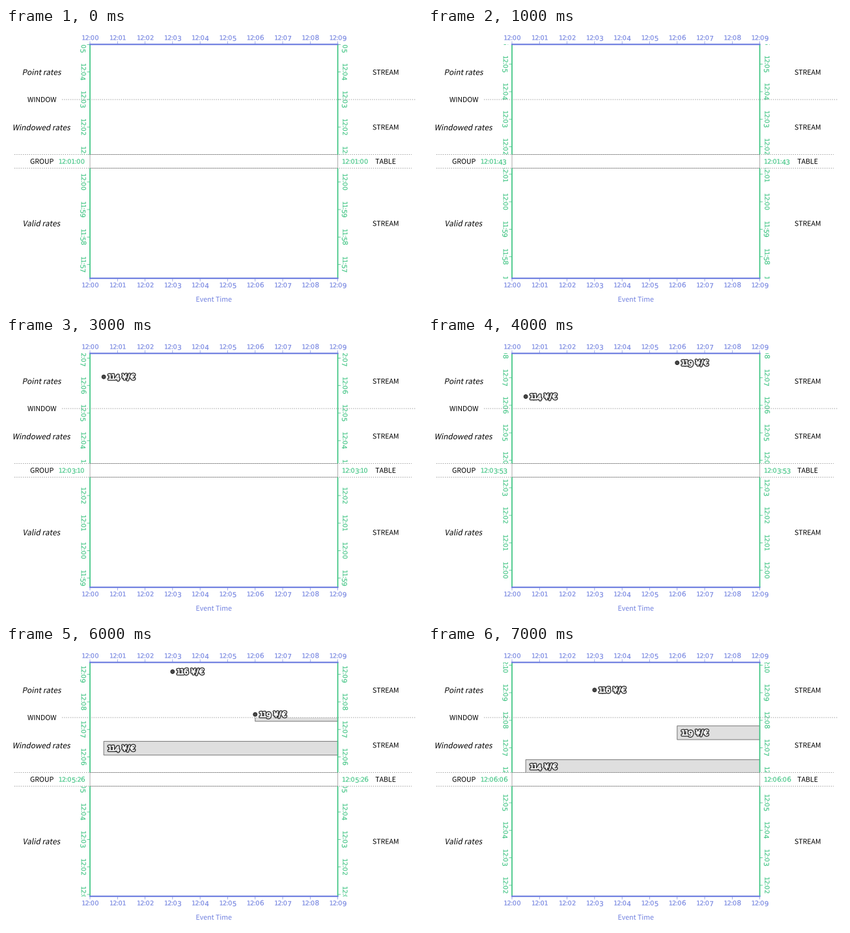
These frames come from a looping animation (639x432 px, 8 s). A matplotlib script:

```python
import matplotlib.pyplot as plt
from matplotlib.animation import FuncAnimation
from matplotlib.patches import Circle, PathPatch, Rectangle
from matplotlib.path import Path
from matplotlib.textpath import TextPath
from matplotlib.transforms import Affine2D

W, H, DPI = 639, 432, 72
BLUE, GREEN, DARK = "#7080e0", "#3cc481", "#3c3c3c"
LEFT, RIGHT, TOP, BOTTOM = 129, 509.6, 25.2, 384.8
WINDOW_Y, NOW_Y, TABLE_Y = 110, 194.5, 215.5
MINUTE = (RIGHT - LEFT) / 9

# Processing time in seconds after 12:00, one value per step.
CLOCK = [60, 103, 146, 190, 233, 279, 326, 366]
# Event minute, processing second, label.
EVENTS = [(0.5, 379, "114 ¥/€"), (6, 452.7, "119 ¥/€"), (3, 546, "116 ¥/€")]

# Glyph advances in ems; the other figures share one width.
ADVANCE = {"0": 0.68, "1": 0.48, "2": 0.57, ":": 0.28, " ": 0.38,
           "/": 0.4, "¥": 0.68, "€": 0.68}

# Keep fractional positions instead of rounding edges to whole pixels.
plt.rcParams["path.snap"] = False

fig = plt.figure(figsize=(W / DPI, H / DPI), dpi=DPI, facecolor="white")
ax = fig.add_axes([0, 0, 1, 1])
ax.set_xlim(0, W)
ax.set_ylim(H, 0)
ax.axis("off")


def clip_box(y0, y1):
    return Rectangle((0, y0), W, y1 - y0, transform=ax.transData)


PLOT_CLIP = clip_box(TOP - 0.5, BOTTOM)
ROW_CLIP = clip_box(WINDOW_Y, NOW_Y + 0.7)


def numerals(text, size):
    """Outline of text with old-style figures, baseline at the origin."""
    parts, x = [], 0
    for char in text:
        scale = 1 if char in "012:" else 1.08
        drop = 0.14 * size if char in "34579" else 0
        if char != " ":
            glyph = TextPath((0, 0), char, size=size * scale,
                             prop={"family": "DejaVu Sans"})
            shift = -0.07 * size if char == "1" else 0
            parts.append(glyph.transformed(
                Affine2D().translate(x + shift, -drop)))
        x += ADVANCE.get(char, 0.57) * size * scale
    return Path.make_compound_path(*parts)


def place(path, x, y, align="center", turned=False):
    """Move an outline to its baseline position on the stage."""
    box = path.get_extents()
    start = box.x0 if align == "left" else (box.x0 + box.x1) / 2
    move = Affine2D().translate(-start, 0)
    if turned:
        move += Affine2D.from_values(0, 1, 1, 0, 0, 0)
    else:
        move += Affine2D().scale(1, -1)
    return path.transformed(move + Affine2D().translate(x, y))


def ink(path, color, z=5, edge=0.1, clip=None):
    patch = PathPatch(path, fc=color, ec=color, lw=edge, zorder=z,
                      joinstyle="round")
    ax.add_patch(patch)
    if clip is not None:
        patch.set_clip_path(clip)
    return patch


def word(text, x, y, color="black", size=10.6, slant=0):
    path = TextPath((0, 0), text, size=size,
                    prop={"family": "Noto Sans CJK JP"})
    path = path.transformed(Affine2D.from_values(1, 0, slant, 1, 0, 0))
    ink(place(path, x, y + 0.36 * size), color, edge=0)


def line(xs, ys, color, lw, z=4, **style):
    return ax.plot(xs, ys, color=color, lw=lw, zorder=z,
                   solid_capstyle="butt", dash_capstyle="butt", **style)[0]


def stage():
    for m in range(10):
        x = LEFT + m * MINUTE
        label = numerals(f"12:{m:02d}", 9.7)
        for base, y0, y1 in ((18.4, 20.5, TOP), (398.6, BOTTOM, 389.5)):
            ink(place(label, x + 0.6, base), BLUE)
            line([x, x], [y0, y1], BLUE, 0.7)
    word("Event Time", 319.5, 417, BLUE)

    for y in (TOP, BOTTOM):
        line([LEFT - 1, RIGHT + 1], [y, y], BLUE, 2.2, z=7)
    for x in (LEFT, RIGHT):
        line([x, x], [TOP, NOW_Y], GREEN, 1.7, z=6)
        line([x, x], [TABLE_Y, BOTTOM], GREEN, 1.7, z=6)

    # The table row hides whatever scrolls beneath it.
    ax.add_patch(Rectangle((100, NOW_Y), 440, TABLE_Y - NOW_Y,
                           fc="white", ec="none", zorder=3))
    ax.add_patch(Rectangle((LEFT, NOW_Y), RIGHT - LEFT, TABLE_Y - NOW_Y,
                           fc="none", ec="#aaaaaa", lw=1, zorder=4))
    for y, x0, x1 in ((WINDOW_Y, 86, 630), (NOW_Y, 13, 623),
                      (TABLE_Y, 13, 623)):
        line([x0, x1], [y, y], "#888888", 0.9, z=4.5,
             linestyle=(0, (1.4, 2.2)))

    for text, y in (("Point rates", 68), ("Windowed rates", 153),
                    ("Valid rates", 300.5)):
        word(text, 55.4, y, size=11.8, slant=0.2)
    word("WINDOW", 55.2, 110)
    word("GROUP", 55.2, 205)
    word("TABLE", 583, 205)
    for y in (68, 152.5, 300.5):
        word("STREAM", 583, y)


def time_axis(now):
    parts = []
    for m in range(-5, 12):
        y = NOW_Y + (now / 60 - m) * MINUTE
        if not TOP - 20 < y < BOTTOM + 20:
            continue
        text = f"{12 + m // 60}:{m % 60:02d}"
        label = numerals(text, 9.7)
        for x, base, out in ((LEFT, 115.7, -4.5), (RIGHT, 517.4, 4.5)):
            parts.append(ink(place(label, base, y, turned=True), GREEN, z=2,
                             clip=PLOT_CLIP))
            tick = line([x, x + out], [y, y], GREEN, 0.8, z=2)
            tick.set_clip_path(PLOT_CLIP)
            parts.append(tick)
    clock = f"12:{now // 60:02d}:{now % 60:02d}"
    for x in (81.7, 517):
        parts.append(ink(place(numerals(clock, 9.7), x, 208.6, "left"),
                         GREEN))
    return parts


def event(now, minute, due, text):
    x = LEFT + minute * MINUTE
    y = NOW_Y - (due - now) / 60 * MINUTE
    if y < TOP - 8:
        return []
    bar = Rectangle((x, y - MINUTE / 4), RIGHT - x, MINUTE / 2,
                    fc="#dfdfdf", ec="#777777", lw=1, zorder=1)
    ax.add_patch(bar)
    bar.set_clip_path(ROW_CLIP)
    parts = [bar]
    if y < WINDOW_Y:
        dot = Circle((x, y), 2.9, fc="#4a4a4a", ec="#222222", lw=1,
                     zorder=5)
        ax.add_patch(dot)
        dot.set_clip_path(PLOT_CLIP)
        parts.append(dot)
    path = place(numerals(text, 10.8), x + 7.2, y + 4, "left")
    parts.append(ink(path, DARK, z=5, edge=3.8, clip=PLOT_CLIP))
    parts.append(ink(path, "white", z=5.1, edge=0.8, clip=PLOT_CLIP))
    return parts


moving = []


def draw(step):
    while moving:
        moving.pop().remove()
    now = CLOCK[step]
    moving.extend(time_axis(now))
    for item in EVENTS:
        moving.extend(event(now, *item))
    return moving


stage()
anim = FuncAnimation(fig, draw, frames=len(CLOCK), interval=1000,
                     init_func=lambda: [], repeat=True, repeat_delay=0,
                     blit=False)
plt.show()
```
